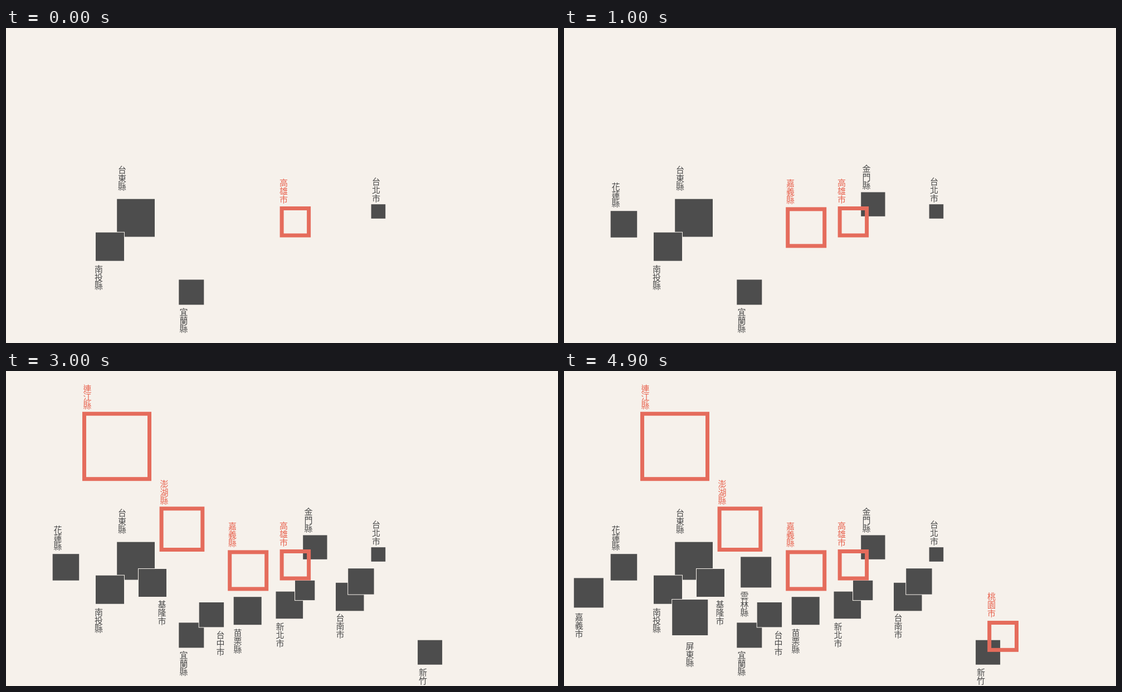
Recreate the animation shown at these times as an HTML page. Size 991x565 px, loop 5500 ms.

```html
<!DOCTYPE html>
<html lang="zh-Hant">
<head>
<meta charset="utf-8">
<style>
  html, body { margin: 0; width: 100%; height: 100%; overflow: hidden; background: #f6f1eb; }
  svg { display: block; }
  text { font: 15px "Noto Sans CJK TC", "Noto Sans CJK", sans-serif; text-anchor: middle; fill: #4a4a4a; }
  text.hot { fill: #e8634f; }
  .solid { fill: #4d4d4d; stroke: #f6f1eb; stroke-width: 2; paint-order: stroke; }
  .open { fill: none; stroke: #e56c5c; stroke-width: 7; }
</style>
</head>
<body>
<svg width="991" height="565" viewBox="0 0 991 565"></svg>
<script>
const svg = document.querySelector('svg');
const STEP = 1000, LOOP = 5500, LAST = 4, EM = 15, BORDER = 7;

// step, x, y, side, then label, its centre x and its top; back to front
const solid = [
  [0, 199.2, 306.7, 67.8, '台東縣', 208.5, 247],
  [0, 161, 366.7, 51, '南投縣', 166.5, 425],
  [0, 310.3, 451.4, 45, '宜蘭縣', 319, 502],
  [0, 655.6, 316.2, 25.6, '台北市', 664.5, 267.5],
  [1, 83.7, 328.2, 47.5, '花蓮縣', 93, 276.5],
  [1, 533.2, 294.5, 43.3, '金門縣', 543, 244.5],
  [2, 238, 355, 50, '基隆市', 280, 411],
  [2, 346.7, 415, 44.4, '台中市', 385, 466],
  [2, 592, 379.8, 50.5, '台南市', 600, 435],
  [3, 408.7, 405.2, 50, '苗栗縣', 416, 462],
  [3, 484.5, 395.6, 48.6, '新北市', 492, 450.5],
  [2, 519, 375.8, 35.3, '', 0, 0],
  [3, 614.2, 354.2, 46.4, '', 0, 0],
  [3, 739.1, 482.7, 44, '新竹', 748.5, 532.5],
  [4, 17.8, 371.4, 53, '嘉義市', 27, 434],
  [4, 194.2, 410, 64, '屏東縣', 226, 486],
  [4, 317.2, 333.4, 55, '雲林縣', 324, 396]
];
const open = [
  [0, 491.6, 320, 55.5, '高雄市', 498.5, 270],
  [1, 398.2, 321.4, 73, '嘉義縣', 406.5, 271],
  [2, 275.6, 243.3, 80.7, '澎湖縣', 284, 194.5],
  [3, 137, 73.2, 124, '連江縣', 146, 24],
  [4, 760.2, 448, 55.8, '桃園市', 767.5, 397]
];
const parts = [];

function add(step, tag, attrs, text = '') {
  const node = document.createElementNS('http://www.w3.org/2000/svg', tag);
  for (const key in attrs) node.setAttribute(key, attrs[key]);
  node.textContent = text;
  svg.append(node);
  parts.push({ node, step });
}

function addSquare([step, x, y, side], kind, inset) {
  const size = side - 2 * inset;
  add(step, 'rect', { class: kind, x: x + inset, y: y + inset, width: size, height: size });
}

function addLabel([step, , , , label, x, top], kind) {
  [...label].forEach((char, i) =>
    add(step, 'text', { class: kind, x, y: top + EM * (i + 0.88) }, char));
}

solid.forEach(s => addSquare(s, 'solid', 0));
open.forEach(s => addSquare(s, 'open', BORDER / 2));
solid.forEach(s => addLabel(s, ''));
open.forEach(s => addLabel(s, 'hot'));

function draw() {
  const now = Math.min(LAST, Math.floor(performance.now() % LOOP / STEP));
  for (const { node, step } of parts) node.style.display = step <= now ? '' : 'none';
  requestAnimationFrame(draw);
}
draw();
</script>
</body>
</html>
```
